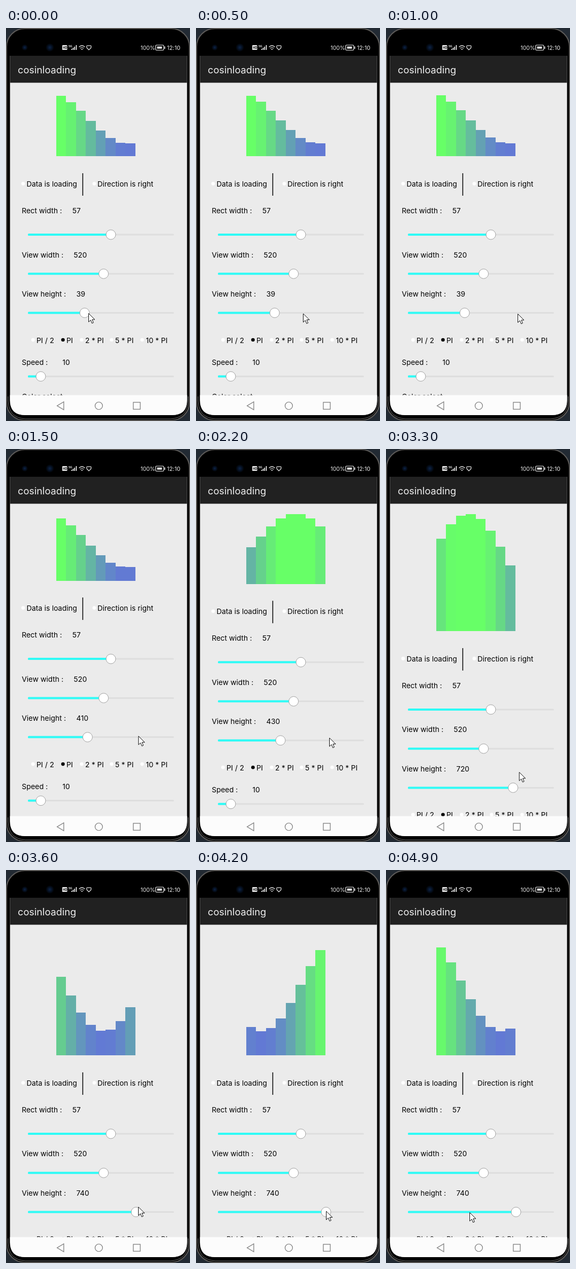
An HTML page for the animation above (5000 ms loop, 344 by 736 pixels).

```html
<!DOCTYPE html>
<html lang="en">
<head>
<meta charset="utf-8">
<title>cosinloading</title>
<style>
html, body { margin: 0; width: 100%; height: 100%; overflow: hidden; background: #222a33; }
svg { display: block; width: 344px; height: 736px; font: 13.5px Inter, Roboto, sans-serif; font-feature-settings: "calt" 0; }
</style>
</head>
<body>
<svg viewBox="0 0 344 736">
  <defs>
    <clipPath id="page"><rect x="8" y="103" width="330.500" height="585"/></clipPath>
    <radialGradient id="lens"><stop offset="0" stop-color="#0c2348"/><stop offset="1" stop-color="#000"/></radialGradient>
  </defs>

  <rect x="1" y="1" width="342" height="734" rx="34" stroke="#5c5a58" stroke-width="2"/>
  <path d="M4 690V698Q5 730 36 732H308Q339 730 340.500 698V690" fill="none" stroke="#6a6a6a"/>
  <path d="M7.500 52H338.500V697Q338.500 725 310 725H36Q7.500 725 7.500 697Z" fill="#ebebeb"/>
  <rect x="7.500" y="52" width="331" height="50.500" fill="#212121"/>
  <text x="22" y="85" font-size="18.200" fill="#efefef">cosinloading</text>

  <!-- status bar -->
  <circle cx="35" cy="36.500" r="6" fill="url(#lens)"/>
  <circle cx="82" cy="36.500" r="8" fill="url(#lens)"/>
  <g fill="#eee">
    <rect x="105" y="32" width="9.500" height="9" rx="1.500"/>
    <text x="106.300" y="39" font-size="5.500" font-weight="700" style="fill:#000">HD</text>
    <text x="117" y="36" font-size="5" font-weight="700">5G</text>
    <path d="M122 41v-2h1.700v2zM124.700 41v-4h1.700v4zM127.400 41v-6h1.700v6zM130.600 41v-9h1.700v9z"/>
    <text x="251.500" y="40.500" font-size="10.300">100%</text>
    <text x="301" y="40.500" font-size="10.700">12:10</text>
    <rect x="282.500" y="34.700" width="9" height="4"/>
    <rect x="296" y="34.500" width="1.500" height="4.500"/>
  </g>
  <g fill="none" stroke="#eee" stroke-width="1.200">
    <path d="M136.500 35.500q5.500-5 11 0M138.500 38q3.500-3 7 0M140.500 40.300q1.500-1.200 3 0"/>
    <path d="M155 41L151 37V33.500Q153 32 155 33.500Q157 32 159 33.500V37Z"/>
    <rect x="279.800" y="32" width="15" height="9.500" rx="1.500"/>
  </g>

  <g clip-path="url(#page)">
    <g id="bars"></g>
    <g id="form">
      <path d="M143.500 272V314" stroke="#000" stroke-width="1.500"/>
    </g>
  </g>

  <!-- navigation bar -->
  <path d="M7.500 687.500H338.500V697Q338.500 725 310 725H36Q7.500 725 7.500 697Z" fill="#fcfcfc"/>
  <g fill="none" stroke="#777" stroke-width="1.200">
    <path d="M108 700V715L95.500 707.500Z"/>
    <circle cx="173.500" cy="707.500" r="7"/>
    <rect x="238" y="701" width="13" height="13"/>
  </g>
  <path id="cursor" d="M0 0V16L3.800 12.500L6.300 18.500L9 17.300L6.500 11.500H11.500Z" fill="#fff" stroke="#111" stroke-linejoin="round"/>
</svg>
<script>
const $ = id => document.getElementById(id);
const bars = $('bars'), form = $('form'), cursor = $('cursor');

function add(parent, tag, attrs, text = '') {
  const el = document.createElementNS('http://www.w3.org/2000/svg', tag);
  set(el, attrs);
  el.textContent = text;
  return parent.appendChild(el);
}
function set(el, attrs) {
  for (const k in attrs) el.setAttribute(k, attrs[k]);
}
const label = (x, y, s) => add(form, 'text', { x, y }, s);
const dot = (cx, cy, fill = '#fff') => add(form, 'circle', { cx, cy, r: 3.3, fill });

function slider(y, x) {
  add(form, 'rect', { x: 41, y: y - 1.5, width: 273, height: 3, rx: 1.5, fill: '#dedede' });
  const fill = add(form, 'rect', { x: 41, y: y - 2, height: 4, rx: 1.5, fill: '#2ffbf6' });
  const knob = add(form, 'circle', { cy: y, r: 9, fill: '#fff', stroke: '#909090', 'stroke-width': .8 });
  const move = x => { set(fill, { width: x - 41 }); set(knob, { cx: x }); };
  move(x);
  return move;
}

dot(32, 291.5);
label(38.5, 297, 'Data is loading');
dot(165, 291.5);
label(171, 297, 'Direction is right');
label(29.5, 347, 'Rect width :');
label(124, 347, '57');
slider(387, 196);
label(29.5, 429.5, 'View width :');
label(126.5, 429.5, '520');
slider(460.3, 182.5);
label(29.5, 503, 'View height :');
const valueText = label(131.5, 503, '');
const moveHeight = slider(533.5, 147);
[[50.5, 57, 'PI / 2'], [106.5, 113, 'PI'], [141.5, 148, '2 * PI'], [197.5, 204, '5 * PI'], [254.5, 261.5, '10 * PI']]
  .forEach(([x, tx, s]) => { dot(x, 584, s === 'PI' ? '#000' : '#fff'); label(tx, 589.5, s); });
label(29.5, 631, 'Speed :');
label(105.5, 631, '10');
slider(652.5, 65);
label(29.5, 695, 'Color select :');

const bar = Array.from({ length: 8 }, () => add(bars, 'rect', { 'shape-rendering': 'crispEdges' }));

// Linear interpolation through [time, value] points
function track(points, t) {
  let i = 1;
  while (i < points.length - 1 && t > points[i][0]) i++;
  const [t0, a] = points[i - 1], [t1, b] = points[i];
  return a + (b - a) * Math.max(0, (t - t0) / (t1 - t0));
}
const PHASE = [[0, .497], [1000, -12.095], [2200, -26.9], [2700, -31.266], [3600, -42.54], [4200, -47.55], [4900, -55.81]];
const HEIGHT = [[0, 390], [1200, 390], [1800, 430], [2200, 430], [2700, 660], [3500, 740], [5000, 740]];
const CX = [[0, 154.5], [1000, 246.5], [2200, 249.5], [2700, 252.5], [3600, 247.5], [4200, 243.5], [4500, 240.5], [4900, 156.5]];
const CY = [[0, 534.5], [1000, 535.5], [2200, 541], [2700, 554], [3600, 631], [4200, 639], [4900, 641.5]];

function draw(t) {
  if (t > 1800 && t < 2200) t = 1800; // the screen stalls here
  const value = Math.round(track(HEIGHT, t) / 10) * 10;
  const full = value * .3057, bottom = 121.2 + full, phase = track(PHASE, t);

  bar.forEach((el, i) => {
    const c = Math.cos(phase + i * Math.PI / 8);
    const h = full * (.6 + .4 * c), k = Math.min(1, (1 + c) * .55);
    const mix = (a, b) => Math.round(a + (b - a) * k);
    set(el, {
      x: 93.5 + i * 18.55, y: bottom - h, width: 18.55, height: h,
      fill: `rgb(${mix(98, 103)},${mix(121, 255)},${mix(212, 103)})`
    });
  });
  set(form, { transform: `translate(0 ${(value - 390) * .3057})` });
  valueText.textContent = value === 390 ? '39' : value;
  moveHeight(147 + (value - 390) * .2745);
  set(cursor, { transform: `translate(${track(CX, t)} ${track(CY, t)})` });
}

const start = performance.now();
function frame() {
  const t = (performance.now() - start) % 5000;
  draw(Math.floor(t / 100) * 100);
  requestAnimationFrame(frame);
}
frame();
</script>
</body>
</html>
```
